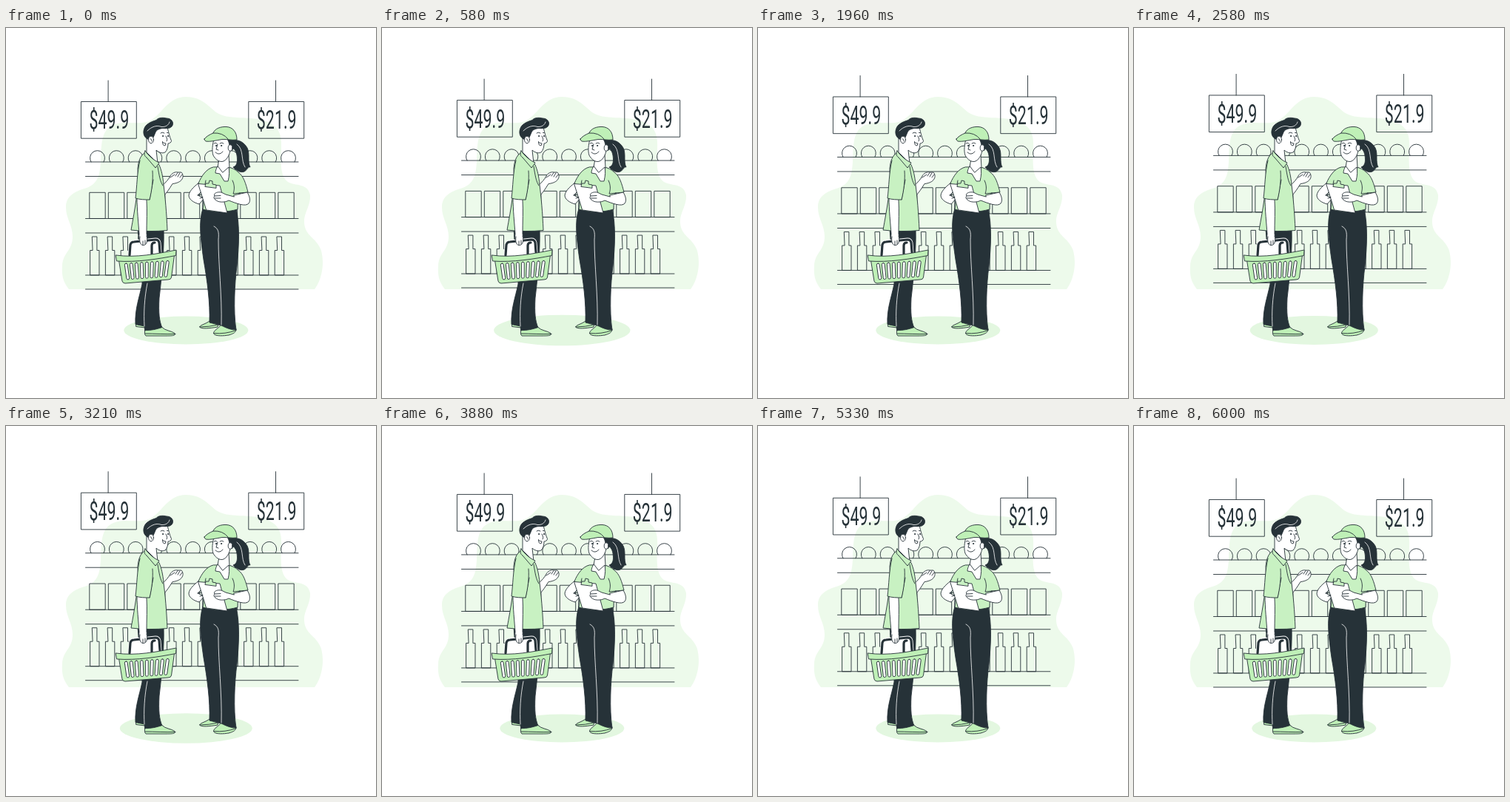
An HTML page that plays this animation: 500x500 px, repeating every 6.04 s.

```html
<!DOCTYPE html>
<html lang="en">
<head>
<meta charset="utf-8">
<title>Supermarket</title>
<style>
  html, body { margin: 0; width: 100%; height: 100%; overflow: hidden; background: #fff; }
  svg { display: block; width: 100%; height: 100%; }
  .art { fill: none; stroke: #263238; stroke-width: .9; stroke-linecap: round; stroke-linejoin: round; }
  .w { fill: #fff; }
  .g { fill: #bff0b7; }
  .shirt { fill: #c8f1c2; }
  .d { fill: #263238; }
  .light { stroke: #fff; stroke-width: .8; }
  .grip { stroke-width: 3.2; }
  .halo { stroke: #fff; stroke-width: 4.8; }
  text { font: 400 34.5px Roboto, "Liberation Sans", sans-serif; fill: #263238; stroke: none; text-anchor: middle; }
</style>
</head>
<body>
<svg viewBox="0 0 500 500">
  <path fill="#edfaeb" d="M85 353C77 343 75 334 76 321C77 303 90 301 90 282C90 266 81 258 81 242C81 227 93 221 106 217C124 212 127 199 128 180C129 158 128 138 145 131C162 124 182 133 197 124C212 114 220 93 243 93C264 93 273 105 284 114C300 125 328 118 351 126C370 133 373 145 372 164C371 184 371 201 381 208C391 214 408 209 411 226C412 240 402 250 403 263C404 282 420 283 426 301C431 321 426 341 417 353Z"/>
  <g class="art" id="store"></g>
  <ellipse id="shadow" rx="84" ry="19" fill="#e3f7e0"/>

  <g class="art" id="man">
    <path class="g" d="M176 398L188 402V405L176 403.5Z"/>
    <path class="d" d="M178 272H213C214 300 210 340 207 365C206 385 207 396 211 405L188 411L187 403L175 400.5C174 380 180 365 184 346C184 320 180 295 178 272Z"/>
    <path class="light" d="M191 345C187 365 186 385 187 403"/>
    <path class="g" d="M188 408.5C195 409 204 407 211 404.5C215 409 223 409 228 412.5C230 416 224 416 216 416H189C187 414 187 411 188 408.5Z"/>
    <path d="M188 413C200 413 216 414 229 413.5"/>
    <path class="w" d="M211 213C216 209 220 204 222 200C224 196 229 194 232 195L237 195C239 197 240 201 238 204C236 208 230 210 225 210.5C221 217 217 223 213 227Z"/>
    <path d="M222 202L228 198M229 200L232 195.5M232 201L235 196M235 202L238 198"/>
    <path class="w" d="M190 148L190 168L205 183L203 165C206 168 211 170 215 168C218 165 219 160 219 156C221 156 223.5 154.5 223.5 152.5C221 147 220 142 218 134L201 132Z"/>
    <path class="shirt" d="M188 168C181 173 179 180 178 190C180 215 174 245 169 273C185 275 203 275 218 273.5C217 250 215 227 213 212C212 200 210 192 207 185Z"/>
    <path class="shirt" d="M188 166C186 170 187 173 190 175L202 189C204 186 206 184 207 182C200 179 193 173 188 166Z"/>
    <path d="M205 187C207 199 208 207 212 213M194 232L199 205"/>
    <path class="w" d="M177 230C177 245 179 265 180 278C179 286 181 292 185 293C190 293 192 287 190 278C190 262 191 247 190 232Z"/>
    <path class="shirt" d="M181 179C177 195 177 215 175 230C181 232 188 232 194 232C197 220 199 205 198 193"/>
    <path class="d" d="M191 150C184 146 185 137 189 132C194 127 199 126 203 124.5C206 120.5 213 121 217 122C223 122 227 127 225 131.5C223 136 217 136 212 135.5C207 136 203 138 202 141L199 148L194 150Z"/>
    <path class="light" d="M191 139C197 133 204 131 210 133.5C216 134 220 131 221 127"/>
    <ellipse class="w" cx="196" cy="151" rx="3.5" ry="4.8"/>
    <path d="M195 150Q197 149 197 153M209 142Q211 140 214 142M217.5 141.5L219 141.5M216 146Q219 151 217 153"/>
    <path class="w" d="M211.5 154Q213 156 216 156Q216 159.5 213.5 159Q211.5 158 211.5 154Z"/>
    <circle class="d" cx="212" cy="146" r=".6"/><circle class="d" cx="219" cy="146" r=".6"/>
  </g>

  <g class="art" id="basket">
    <path class="w" stroke="none" d="M168 291L205 287L208 306L167 311Z"/>
    <g id="handle"></g>
    <path class="w" d="M181 282C180 288 181 293 185 293.5C190 294 192 288 190 281"/>
    <path d="M185 288V293M188 287V292"/>
    <path class="g" d="M152.5 314L157 342Q158 345 161 345L219 340Q223 340 223.5 337L227.5 307Z"/>
    <g id="slots"></g>
    <path class="g" d="M148.5 307C176 311 204 305 230 300L229.5 307.5C206 312 177 317 150 315Z"/>
  </g>

  <g class="art" id="woman">
    <path class="g" d="M275 396C270 400 263 401 261.5 404C264 407 275 406 286 404L287 398Z"/>
    <path class="g" d="M291 401C287 406 280 409 280.5 413C283 417 295 416 301 415C308 413 311 411 311 407Z"/>
    <path d="M262 404Q275 404 286 401M281 412.5Q296 414 311 408.5"/>
    <path class="d" d="M266 244H311C316 267 315 294 312 322C309 345 307 382 311 408C304 408 297 405 291 402L275 398C276 371 272 342 267 313C263 285 260 262 266 244Z"/>
    <path class="light" d="M281 268C287 271 288 276 287 286C287 320 292 361 291 401"/>
    <path class="d" d="M303 153C311 149 321 153 326 162C330 170 326 181 330 188C327 187 327 191 322 194C318 196 311 193 307 188C313 186 313 179 312 172C311 166 308 162 303 161Z"/>
    <path class="light" d="M312 157C322 164 317 179 323 188"/>
    <path class="w" d="M263 207C256 213 248 219 247 226C247 232 254 236 261 238L268 230L259 226L269 216Z"/>
    <path class="shirt" d="M280 188C271 190 264 200 260 210L268 216C268 226 267 236 266 245C281 250 299 249 313 245C313 237 314 230 315 223L327 222C324 210 321 200 314 195C310 191 305 189 301 188Z"/>
    <path d="M306 206C309 212 309 218 307 224L316 223M270 206L268 216"/>
    <path class="w" d="M288 177L286 188L295 205L302 189L301 171Z"/>
    <path class="w" d="M286 187C284 190 283 193 283 196L289 197L295 207L300 207C302 199 302 193 301 188L293 195Z"/>
    <path class="w" d="M281 150C279 158 278 166 280 172C283 178 289 182 294 180C300 177 303 169 304 160L303 149Z"/>
    <path class="d" d="M299 150H311C311 156 309 161 305 166C301 161 303 156 299 150Z"/>
    <ellipse class="w" cx="303" cy="162" rx="2.8" ry="4.2"/>
    <path class="g" d="M268 150C270 147 275 144 280 142C282 136 290 133 298 133.5C306 134 312 140 312 151C305 152 299 150 292 150.5C284 152 275 154 270 153Q268 152 268 150Z"/>
    <path d="M280 142Q293 141 300 150M281 156Q283 154 285 156M289 156Q292 154 294 156M286 157L284 164L287 165M283 168Q288 173 293 167"/>
    <circle class="d" cx="284" cy="159" r=".6"/><circle class="d" cx="291" cy="159" r=".6"/>
    <path class="w" d="M260 210.5L289 213L299 250L271 246Z"/>
    <path class="shirt" d="M269 214L270 210L274 210L275 206L279 207L279 211L284 212L284 216Z"/>
    <path class="w" d="M308 226L326 222C329 227 331 233 328 237C324 242 311 237 301 233C296 236 286 236 283 232C280 230 281 228 282 227C280 224 284 221 291 222L297 225L308 228Z"/>
    <path d="M282 227L290 226.5M282 230L290 230M259 226L264 225M262 230L266 229"/>
  </g>
</svg>
<script>
const $ = id => document.getElementById(id);
const repeat = (n, draw) => Array.from({ length: n }, (_, i) => draw(i)).join('');

const sign = (x, label) => `<path d="M${x + 36.3} 71V99.5"/>
  <rect x="${x}" y="99.5" width="74.5" height="49.7"/>
  <text transform="translate(${x + 37.5} 136.5) scale(.62 1)">${label}</text>`;

$('store').innerHTML =
  repeat(11, i => `<path d="M${115 + 25.8 * i} 181a10 10 0 1 1 17 0"/>`) +
  repeat(11, i => `<rect x="${113.2 + 25.5 * i}" y="222.3" width="21" height="35.2"/>`) +
  repeat(13, i => `<path d="M${116.7 + 20.8 * i} 282h6.2v18.5h3.1V334h-12.4v-33.5h3.1z"/>`) +
  [181, 200.5, 257.5, 277, 334, 353].map(y => `<path d="M107.5 ${y}H395"/>`).join('') +
  sign(101.8, '$49.9') + sign(328.2, '$21.9');

const grip = 'M167 307L168 293Q169 289 173 289L202 286Q206 286 207 290L208 303M197 305V294Q197 290 201 290';
$('handle').innerHTML = ['halo', 'grip'].map(kind => `<path class="${kind}" d="${grip}"/>`).join('');

$('slots').innerHTML = repeat(9, i =>
  `<rect class="w" x="-1.9" y="-11" width="3.8" height="22" rx="1.9"
    transform="translate(${163.5 + 6.7 * i} ${329 - .45 * i}) rotate(${2 * i - 8})"/>`);

// Piecewise linear beat: [phase, scale]
const beat = [[0, 1], [.1, 1.1], [.3, 1], [.4, 1], [.5, 1.1], [.6, 1], [1, 1]];
function pulse(p) {
  const i = beat.findIndex(([end]) => p < end);
  const [[a, from], [b, to]] = [beat[i - 1], beat[i]];
  return from + (to - from) * (p - a) / (b - a);
}

function frame(now) {
  const phase = (now % 6040) / 6000 % 1;
  const lift = 10 * (1 - Math.abs(1 - 2 * phase));
  $('store').setAttribute('transform', `translate(0 ${-lift})`);
  $('shadow').setAttribute('transform', `translate(243.3 408.5) scale(${pulse(phase)})`);
  requestAnimationFrame(frame);
}
frame(performance.now());
</script>
</body>
</html>
```
